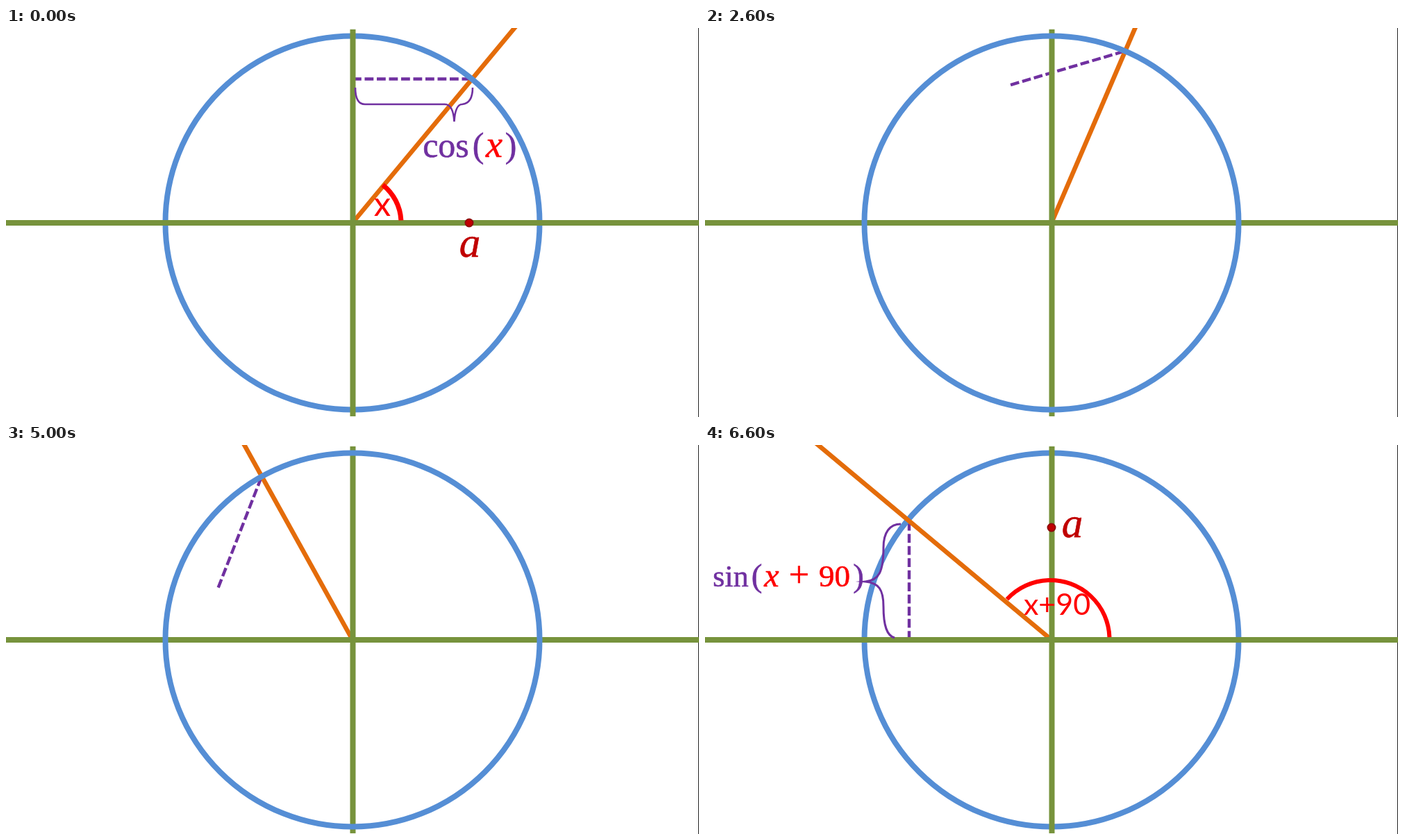
These frames come from a looping animation (998 by 561 pixels, 8000 ms). An HTML page with a canvas:

```html
<!DOCTYPE html>
<html lang="en">
<head>
<meta charset="utf-8">
<title>cos(x) = sin(x + 90)</title>
<style>
  html, body { margin: 0; overflow: hidden; background: #fff; }
  canvas { display: block; }
</style>
</head>
<body>
<canvas id="stage" width="998" height="561"></canvas>
<script>
const ctx = document.getElementById("stage").getContext("2d");
const CX = 499, CY = 281, RADIUS = 269.5;
const LOOP = 8000, START = 1400, STEP = 400;
const BLUE = "#558ed5", GREEN = "#77933c", ORANGE = "#e46c0a";
const PURPLE = "#7030a0", RED = "#ff0000", DARK_RED = "#c00000";
const SERIF = '"Liberation Serif", serif', SANS = "Lato, sans-serif";

// Turn of the ray in degrees, held for one step each
const TURNS = [0, 6.6, 11, 16.5, 22.9, 34.3, 42, 49.2, 62.2, 68.7, 75, 81, 89.8];
const rad = deg => deg * Math.PI / 180;

function stroke(path, color, width) {
  ctx.strokeStyle = color;
  ctx.lineWidth = width;
  ctx.stroke(new Path2D(path));
}

function arc(x, y, r, from, to, color, width) {
  ctx.beginPath();
  ctx.arc(x, y, r, -rad(from), -rad(to), true);
  ctx.strokeStyle = color;
  ctx.lineWidth = width;
  ctx.stroke();
}

function text(str, x, y, font, color, weight = 0) {
  ctx.font = font;
  ctx.textAlign = "center";
  ctx.fillStyle = ctx.strokeStyle = color;
  ctx.fillText(str, x, y);
  if (weight) {
    ctx.lineWidth = weight;
    ctx.strokeText(str, x, y);
  }
}

const math = (str, x, y, size, color) => text(str, x, y, `${size}px ${SERIF}`, color, 0.6);
const italic = (str, x, y, size, color) => text(str, x, y, `italic ${size}px ${SERIF}`, color, 0.6);

function circle() {
  arc(CX, CY, RADIUS, 0, 360, BLUE, 8);
}

function axes() {
  ctx.fillStyle = GREEN;
  ctx.fillRect(0, 277, 998, 8);
  ctx.fillRect(495.5, 2, 8, 558);
}

function turned(turn, draw) {
  ctx.save();
  ctx.translate(CX, CY);
  ctx.rotate(-rad(turn));
  draw();
  ctx.restore();
}

function ray(turn) {
  turned(turn + 50.3, () => stroke("M0 0H480", ORANGE, 6.6));
}

function dashes(turn, height) {
  turned(turn, () => {
    ctx.setLineDash([12.8, 4.7]);
    stroke(`M0 ${-height}H172`, PURPLE, 4.4);
  });
}

function point(x, y) {
  ctx.beginPath();
  ctx.arc(x, y, 5.6, 0, 7);
  ctx.fillStyle = DARK_RED;
  ctx.fill();
  ctx.strokeStyle = "#8c0d0d";
  ctx.lineWidth = 1.8;
  ctx.stroke();
}

function cosineLabels() {
  arc(CX, CY, 70, 3, 51.5, RED, 7);
  text("x", 542, 271, `49px ${SANS}`, RED);
  stroke("M503 86C503 101 507 110 517 110H632Q644 110 645.5 135Q647 110 657 110C667 109 672 100 672 86", PURPLE, 2.6);
  math("cos", 633.5, 186, 50, PURPLE);
  math("(", 680, 186, 50, PURPLE);
  italic("x", 703, 186, 54, RED);
  math(")", 727, 186, 50, PURPLE);
  point(667, 281);
  italic("a", 668, 330, 61, DARK_RED);
}

function sineLabels() {
  arc(497.5, 280, 85, 2, 137.5, RED, 6);
  text("x+90", 507, 245, `43px ${SANS}`, RED);
  stroke("M282 114C266 114 257 126 257 148C257 184 250 195 231 197C250 199 257 208 257 233C257 261 262 275 273 278", PURPLE, 3);
  math("sin", 37, 204, 44, PURPLE);
  math("(", 74.5, 204, 47, PURPLE);
  italic("x", 96, 204, 48, RED);
  math("+", 135.5, 204, 52, RED);
  math("90", 186.5, 204, 45, RED);
  math(")", 221, 204, 47, PURPLE);
  point(499, 119);
  italic("a", 529, 133, 61, DARK_RED);
}

function draw(t) {
  const step = Math.floor((t - START) / STEP);
  const before = step < 0, after = step > 12;
  const turn = TURNS[Math.max(0, Math.min(step, 12))];
  const last = step >= 12;

  ctx.fillStyle = "#fff";
  ctx.fillRect(0, 0, 998, 561);
  ctx.fillStyle = "#222";
  ctx.fillRect(997, 0, 1, 561);

  dashes(last ? 90 : turn, last ? 205 : 207.5);
  if (step >= 11) {
    circle();
    ray(turn);
    axes();
  } else {
    ray(turn);
    const layers = before ? [circle, axes] : [axes, circle];
    layers.forEach(layer => layer());
  }
  if (before) cosineLabels();
  if (after) sineLabels();
}

const begin = performance.now();
function tick() {
  draw((performance.now() - begin) % LOOP);
  requestAnimationFrame(tick);
}
tick();
</script>
</body>
</html>
```
